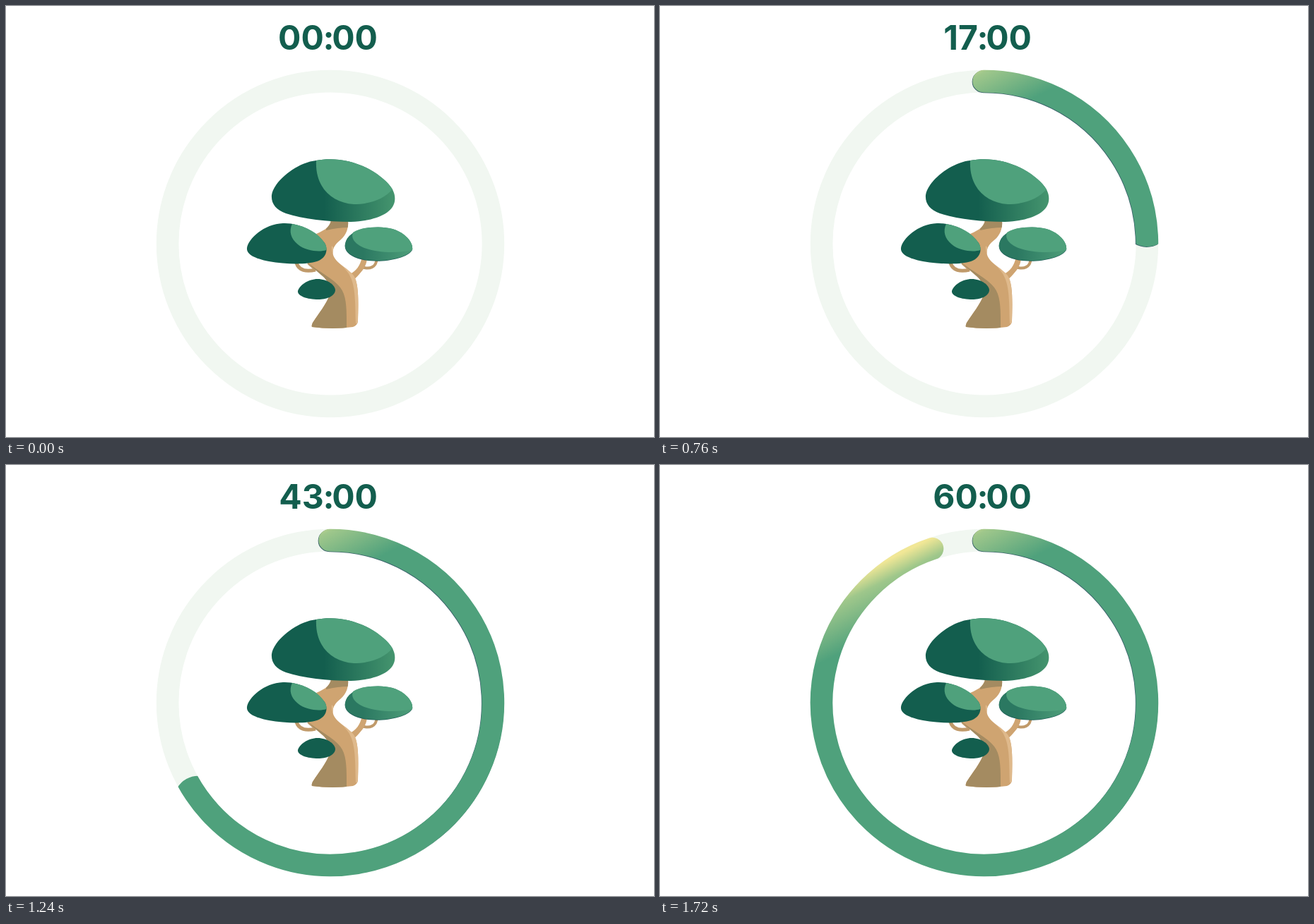
Animation of 917x611 px, one loop 2 s. Source, as an HTML page:

```html
<!DOCTYPE html>
<html lang="en">
<head>
<meta charset="utf-8">
<title>Tree timer</title>
<style>
  html, body { margin: 0; width: 100%; height: 100%; overflow: hidden; background: #fff; }
  svg { display: block; width: 917px; height: 611px; }
  text { font: 700 48px Inter, "Open Sans", sans-serif; fill: #135e4e; }
  .ring { fill: none; stroke-width: 31.6; stroke-linecap: round; }
  .twig { fill: none; stroke: #c09a6a; stroke-width: 5; }
  .dark { fill: #135e4e; }
  .light { fill: #4fa17c; }
</style>
</head>
<body>
<svg viewBox="0 0 917 611">
  <defs>
    <linearGradient id="glow" gradientUnits="userSpaceOnUse" x1="300" y1="145.6" x2="339.5" y2="224.7">
      <stop offset="0" stop-color="#f1e796"/>
      <stop offset=".28" stop-color="#9fc78b"/>
      <stop offset="1" stop-color="#4fa17c"/>
    </linearGradient>
    <linearGradient id="edge" gradientUnits="userSpaceOnUse" x1="0" y1="525" x2="0" y2="558">
      <stop offset="0" stop-color="#3c666c"/>
      <stop offset="1" stop-color="#3c666c" stop-opacity="0"/>
    </linearGradient>
    <linearGradient id="topShade" gradientUnits="userSpaceOnUse" x1="450" y1="0" x2="552" y2="0">
      <stop offset="0" stop-color="#135e4e"/>
      <stop offset="1" stop-color="#46966f"/>
    </linearGradient>
    <linearGradient id="sideShade" gradientUnits="userSpaceOnUse" x1="478" y1="0" x2="568" y2="0">
      <stop offset="0" stop-color="#2b7861"/>
      <stop offset=".3" stop-color="#2b7861"/>
      <stop offset="1" stop-color="#4a9a77"/>
    </linearGradient>
    <clipPath id="sweep"><path id="wedge"/></clipPath>
    <clipPath id="rightSide"><path d="M440 80H720V600H440Z"/></clipPath>
    <clipPath id="trunkClip"><use href="#trunk"/></clipPath>
  </defs>

  <text id="minutes" x="449.8" y="61.5" text-anchor="end">00</text>
  <text x="456.5" y="61.5" text-anchor="middle">:</text>
  <text x="493.5" y="61.5" text-anchor="middle">00</text>

  <circle class="ring" cx="459" cy="337" r="230.4" stroke="#f1f7f1"/>
  <g id="progress">
    <g clip-path="url(#rightSide)">
      <g transform="translate(-.75 .75)">
        <path class="ring bar" clip-path="url(#sweep)" stroke="url(#edge)"/>
      </g>
    </g>
    <path class="ring bar" clip-path="url(#sweep)" stroke="url(#glow)"/>
  </g>

  <g id="tree">
    <path class="twig" d="M411 364C414 375 425 377 438 374M428 364L438 373"/>
    <path class="twig" style="stroke-width:4" d="M503 370C515 374 524 370 524.5 359"/>
    <path fill="#cfa471" d="M487 380C495 376 501 368 503 359L511 359C510 364 509 367 508 369C504 377 497 383 490 391Z"/>
    <path id="trunk" fill="#cfa471" d="M460 304L484 304C485 314 482 324 474 331C465 338 461 345 463 353C467 365 484 372 492 382C499 393 499 415 498 447Q497 453 491 455Q462 459 433 455Q432 453 434 449C444 434 452 424 457 412C462 402 455 388 447 382L424 362L435 325C448 319 458 315 460 304Z"/>
    <g clip-path="url(#trunkClip)">
      <path fill="#a48b61" d="M420 358C440 376 462 385 473 399C483 412 482 432 482 460L425 460Z"/>
      <path fill="#dfb98b" d="M461 340C459 356 474 364 484 378C495 394 494 418 495 450L502 450L502 380L470 350Z"/>
      <path fill="#a48b61" d="M455 300L488 300L485 314Q470 314 453 318Z"/>
    </g>

    <path fill="url(#topShade)" d="M376 268C378 250 410 222 439 219C470 213 505 222 530 242C545 254 552 264 550 277C547 295 520 305 488 306C455 306 420 302 396 294C382 289 375 280 376 268Z"/>
    <path class="light" d="M439 219C470 213 505 222 530 242C538 248 544 255 547 260C535 273 517 281 492 281C462 279 437 258 439 219Z"/>

    <path class="dark" d="M341 343C343 330 365 309 392 308C415 307 440 320 451 336C457 347 452 358 440 362C425 367 395 366 372 362C352 358 340 352 341 343Z"/>
    <path class="light" d="M405 309C425 312 442 322 451 336C454 341 454 345 453 346C445 349 425 348 413 338C403 330 400 319 405 309Z"/>

    <use href="#sideCrown" y=".8" fill="#1f5f58"/>
    <use href="#sideCrown" fill="url(#sideShade)"/>
    <path class="light" d="M491 321C497 317 505 315 515 314C535 312 552 315 563 324C572 331 576 339 575 346C550 352 512 349 498 338C490 332 489 326 491 321Z"/>

    <path class="dark" d="M413 404C415 396 428 387 441 387C455 387 466 396 466 403C465 412 453 416 442 416C426 416 412 411 413 404Z"/>
  </g>
  <defs>
    <path id="sideCrown" d="M480 337C482 325 495 316 515 314C535 312 552 315 563 324C572 331 576 339 575 345C570 355 545 361 525 361C500 361 477 352 480 337Z"/>
  </defs>
</svg>
<script>
  const LOOP = 2000, STEP = 40, START = 240, END = 1720;
  const $ = id => document.getElementById(id);
  const minutes = $('minutes'), wedge = $('wedge'), progress = $('progress');

  // Point on the dial; degrees run clockwise from twelve o'clock.
  function at(r, deg) {
    const a = deg * Math.PI / 180;
    return (459 + r * Math.sin(a)).toFixed(2) + ' ' + (337 - r * Math.cos(a)).toFixed(2);
  }

  function arc(r, from, to) {
    const large = Math.abs(to - from) > 180 ? 1 : 0;
    return `A${r} ${r} 0 ${large} ${to > from ? 1 : 0} ${at(r, to)}`;
  }

  // Ring sector with a softly bulging leading edge.
  function sector(deg) {
    const back = -8, outer = 248, inner = 213;
    return `M${at(outer, back)}${arc(outer, back, deg)}` +
      `A34 34 0 0 1 ${at(inner, deg)}${arc(inner, deg, back)}Z`;
  }

  const smooth = u => u * u * (3 - 2 * u);

  function draw(now) {
    const t = Math.floor(now % LOOP / STEP) * STEP;
    const u = Math.min(1, Math.max(0, (Math.min(t, END) - 200) / 1600));
    const p = smooth(u);
    minutes.textContent = String(Math.round(60 * p)).padStart(2, '0');
    progress.style.display = t < START ? 'none' : '';
    wedge.setAttribute('d', sector(t >= END ? 350 : 322 * p + 24 * p * p - 2.8));
  }

  document.querySelectorAll('.bar').forEach(bar =>
    bar.setAttribute('d', `M${at(230.4, -0.2)}${arc(230.4, -0.2, 341.4)}`));

  function tick(now) {
    draw(now);
    requestAnimationFrame(tick);
  }
  draw(0);
  requestAnimationFrame(tick);
</script>
</body>
</html>
```
